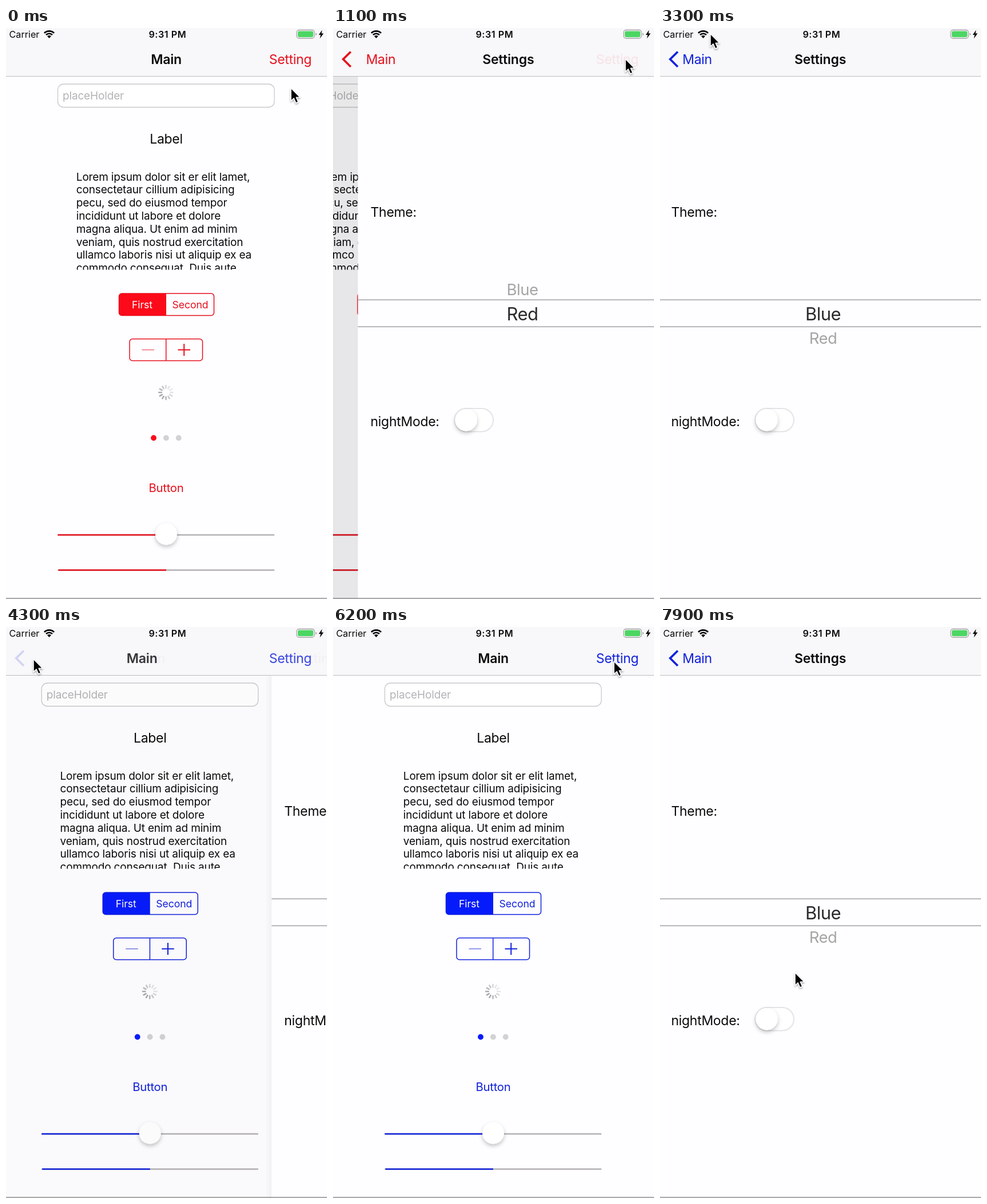
Animation, 561 px wide and 998 px high, one loop 8000 ms. Source, as an HTML page:

```html
<!DOCTYPE html>
<html lang="en">
<head>
<meta charset="utf-8">
<title>Theme switch</title>
<style>
  html, body { margin: 0; width: 100%; height: 100%; overflow: hidden; background: #fefdff; }
  svg { display: block; width: 561px; height: 998px; --tint: #e60f1c; --fill: #fc0a1a; }
  svg.blue { --tint: #1021dc; --fill: #061bfb; }
  text { font-family: Inter, "Liberation Sans", sans-serif; fill: #0a0a0a; }
  .mid { text-anchor: middle; }
  .status { font-size: 16.2px; }
  .clock { font-weight: 600; letter-spacing: .5px; }
  .title { font-size: 23px; font-weight: 600; letter-spacing: -.2px; }
  .label { font-size: 23px; letter-spacing: -.3px; }
  .body { font-size: 19px; letter-spacing: -.16px; }
  .segment { font-size: 17.6px; letter-spacing: -.05px; }
  .button { font-size: 20.3px; letter-spacing: -.25px; }
  .row { font-size: 31px; letter-spacing: -.5px; }
  .tint { fill: var(--tint); }
  .fill { fill: var(--fill); }
  .line { fill: none; stroke: var(--tint); stroke-width: 1.5; }
  .track { fill: none; stroke: #b2b1b4; stroke-width: 2.7; stroke-linecap: round; }
  .done { stroke: var(--tint); }
  .rule { stroke: #8f8e91; stroke-width: 1.3; }
  .page { fill: #fefdff; }
</style>
</head>
<body>
<svg id="stage" viewBox="0 0 561 998">
  <defs>
    <clipPath id="textBox"><rect x="110" y="240" width="340" height="182.5"/></clipPath>
    <linearGradient id="edge">
      <stop offset="0" stop-color="#000" stop-opacity="0"/>
      <stop offset="1" stop-color="#000" stop-opacity=".045"/>
    </linearGradient>
    <filter id="soft" x="-50%" y="-50%" width="200%" height="200%">
      <feDropShadow dx="0" dy="3.5" stdDeviation="3.5" flood-color="#000" flood-opacity=".24"/>
    </filter>
    <filter id="lift" x="-50%" y="-50%" width="200%" height="200%">
      <feDropShadow dx="0" dy="2" stdDeviation="1.4" flood-color="#000" flood-opacity=".35"/>
    </filter>
  </defs>

  <rect class="page" width="561" height="998"/>

  <g id="main">
    <rect x="90.5" y="98" width="378.5" height="40.5" rx="10" fill="#fff" stroke="#c9c8cb" stroke-width="1.3"/>
    <text class="body" x="99" y="124.5" style="fill:#b3b2b6">placeHolder</text>
    <text class="label mid" x="280" y="202.3">Label</text>
    <g id="lorem" clip-path="url(#textBox)"></g>

    <path class="fill" d="M280 464H202.5a5 5 0 0 0-5 5V497.5a5 5 0 0 0 5 5H280z"/>
    <rect class="line" x="197.5" y="464" width="166" height="38.5" rx="5"/>
    <text class="segment mid" x="238" y="489.8" style="fill:#fff">First</text>
    <text class="segment mid tint" x="322" y="489.8">Second</text>

    <rect class="line" x="216" y="543.5" width="127.5" height="38" rx="5"/>
    <path class="line" d="M279.7 543.5v38"/>
    <path class="line" d="M237.5 562.5h21.5" opacity=".6"/>
    <path class="line" d="M300.5 562.5h21.5M311.2 552v21" style="stroke-width:2"/>

    <g id="spinner" transform="translate(279.5 637)" stroke-width="2.6" stroke-linecap="round"></g>

    <circle class="fill" cx="258" cy="716.5" r="4.9"/>
    <circle cx="279.9" cy="716.5" r="4.9" fill="#d2d1d4"/>
    <circle cx="301.7" cy="716.5" r="4.9" fill="#d2d1d4"/>

    <text class="button mid tint" x="280" y="810.5">Button</text>

    <path class="track" d="M91.5 886H468"/>
    <path class="track done" d="M91.5 886H280"/>
    <circle cx="280" cy="884.5" r="19" fill="#fff" filter="url(#soft)"/>
    <path class="track" d="M91.5 947.5H468"/>
    <path class="track done" d="M91.5 947.5H280" style="stroke-linecap:butt"/>
  </g>
  <rect id="dim" y="84" width="561" height="914"/>

  <g id="settings">
    <rect id="shade" x="-13.5" y="84" width="11" height="914" fill="url(#edge)"/>
    <rect class="page" x="-2.5" y="84" width="563.5" height="914"/>
    <text class="label" x="19.5" y="329.8">Theme:</text>
    <path class="rule" d="M-2.5 475.2H561M-2.5 522.2H561"/>
    <text class="row mid" id="blueRow">Blue</text>
    <text class="row mid" id="redRow">Red</text>
    <text class="label" x="19.5" y="695.8">nightMode:</text>
    <rect x="166.5" y="665" width="67.5" height="40.5" rx="20.25" fill="#fff" stroke="#e4e3e7" stroke-width="2"/>
    <circle cx="186.5" cy="685.2" r="19.3" fill="#fff" filter="url(#soft)"/>
  </g>

  <rect width="561" height="84" fill="#f8f7f9"/>
  <path d="M0 84.5H561" stroke="#bdbcc0"/>
  <g id="mainTitle"><text class="title mid" x="280" y="62.8">Main</text></g>
  <g id="setTitle"><text class="title mid" x="280" y="62.8">Settings</text></g>
  <g id="backLabel"><text class="label mid tint" x="65" y="62.8">Main</text></g>
  <path id="chevron" d="M31 41.5L17.7 54.6L31 67.7" fill="none" stroke="var(--tint)" stroke-width="3.6"/>
  <g id="setButton"><text class="label mid tint" x="497" y="62.8">Setting</text></g>

  <text class="status" x="5.5" y="17.2">Carrier</text>
  <text class="status clock mid" x="282.3" y="17.2">9:31 PM</text>
  <path d="M75.5 18l-3.4-3.7a4.8 4.8 0 0 1 6.8 0z"/>
  <path d="M70 12a7.8 7.8 0 0 1 11 0M66.9 8.9a12.2 12.2 0 0 1 17.2 0" fill="none" stroke="#000" stroke-width="2.7"/>
  <rect x="508" y="3.5" width="31" height="14.5" rx="4" fill="none" stroke="#a3a2a5" stroke-width="1.3"/>
  <rect x="510" y="5.5" width="27" height="10.5" rx="2.2" fill="#4cd663"/>
  <path d="M541 8.5q2 .7 2 2.3t-2 2.3z" fill="#a3a2a5"/>
  <path d="M552.5 3.5L546.5 12H550L548.5 18.5L555 9.5H551.3z"/>

  <path d="M0 996.8H561" stroke="#77767a" stroke-width="1.3"/>
  <circle id="ring" r="32.8" fill="none" stroke="#0a0a0a" stroke-width="2.2"/>
  <path id="cursor" d="M0 0V22.5L5 17.8L8.7 26L12.7 24.3L9.2 16.2H16z" stroke="#fff" stroke-width="1.5" stroke-linejoin="round" filter="url(#lift)"/>
</svg>

<script>
const LOOP = 8000, STEP = 100, WIDTH = 561, NS = "http://www.w3.org/2000/svg";
const el = id => document.getElementById(id);

function add(parent, tag, attrs, text = "") {
  const node = document.createElementNS(NS, tag);
  for (const key in attrs) node.setAttribute(key, attrs[key]);
  node.textContent = text;
  parent.append(node);
}

["Lorem ipsum dolor sit er elit lamet,", "consectetaur cillium adipisicing",
 "pecu, sed do eiusmod tempor", "incididunt ut labore et dolore",
 "magna aliqua. Ut enim ad minim", "veniam, quis nostrud exercitation",
 "ullamco laboris nisi ut aliquip ex ea", "commodo consequat. Duis aute"
].forEach((line, i) =>
  add(el("lorem"), "text", { class: "body", x: 122.8, y: 266.6 + i * 22.8 }, line));

for (let i = 0; i < 12; i++) {
  const grey = Math.round(200 - 32 * Math.cos((i - 8) * Math.PI / 6));
  add(el("spinner"), "path", {
    d: "M0-7.8V-12.3", transform: `rotate(${i * 30})`, stroke: `rgb(${grey},${grey},${grey})`
  });
}

// time, x, y of the pointer tip
const POINTER = [
  [0, 498, 105], [200, 498, 105], [600, 511, 54], [1200, 511, 54], [1500, 430, 240],
  [1900, 285, 487], [2150, 285, 487], [2500, 285, 544], [2700, 285, 544], [3000, 180, 250],
  [3300, 88, 10], [3600, 48, 56], [4750, 48, 56], [5000, 290, 44], [5200, 512, 120],
  [5400, 470, 560], [5600, 260, 860], [5800, 100, 640], [6000, 150, 200], [6200, 491, 60],
  [6400, 488, 52], [7100, 488, 52], [7400, 348, 62], [7600, 57, 220], [7900, 236, 604]
];
const PUSH_TIME = 540, PUSH = 859, POP = 4121, PUSH_AGAIN = 6690, THEME = 2680;

const clamp = v => Math.min(1, Math.max(0, v));
const mix = (a, b, k) => a + (b - a) * k;

function pointerAt(t) {
  const i = POINTER.findIndex(p => p[0] > t);
  if (i < 0) return POINTER[POINTER.length - 1].slice(1);
  const a = POINTER[i - 1], b = POINTER[i], k = (t - a[0]) / (b[0] - a[0]);
  return [mix(a[1], b[1], k), mix(a[2], b[2], k)];
}

// cubic-bezier(.36, .66, .04, 1), solved by bisection
function glide(k) {
  const curve = (u, a, b) => 3 * (1 - u) ** 2 * u * a + 3 * (1 - u) * u * u * b + u ** 3;
  let lo = 0, hi = 1;
  for (let i = 0; i < 24; i++) {
    const u = (lo + hi) / 2;
    if (curve(u, .36, .04) < k) lo = u; else hi = u;
  }
  return curve(lo, .66, 1);
}

const slide = (t, start) => {
  const k = clamp((t - start) / PUSH_TIME);
  return k === 0 || k === 1 ? k : glide(k);
};

function place(id, x, y = 0, opacity = 1) {
  el(id).setAttribute("transform", `translate(${x} ${y})`);
  el(id).setAttribute("opacity", clamp(opacity));
}

function placeRow(id, offset) {
  const far = Math.min(1, Math.abs(offset)), size = mix(1, .885, far);
  const grey = Math.round(mix(42, 165, clamp(far * 1.6)));
  const y = 499.3 + offset * 42.6 + 11.2 * size;
  el(id).setAttribute("transform", `translate(285 ${y}) scale(${size})`);
  el(id).style.fill = `rgb(${grey},${grey},${grey})`;
}

function draw(t) {
  const s = slide(t, PUSH) - slide(t, POP) + slide(t, PUSH_AGAIN);
  el("stage").classList.toggle("blue", t >= THEME);

  place("main", -WIDTH * .3 * s);
  place("dim", 0, 0, .1 * s);
  place("settings", WIDTH * (1 - s), 0, s > 0 ? 1 : 0);
  place("shade", 0, 0, 1 - s);

  place("mainTitle", -252 * s, 0, 1 - 1.1 * s);
  place("backLabel", 225 * (1 - s), 0, s < .9 ? s * s * 1.1 : 1);
  place("setTitle", 320 * (1 - s), 0, 1.3 * s - .2);
  place("chevron", 0, 0, s > .9 ? 1 : s);
  place("setButton", 0, 0, 1 - s);

  const k = clamp((t - 2150) / 450), turn = k * k * (3 - 2 * k);
  placeRow("blueRow", turn - 1);
  placeRow("redRow", turn);

  const [x, y] = pointerAt(t);
  place("cursor", x, y);
  place("ring", x, y + 3, t >= 2000 && t < 2700 ? 1 : 0);
}

const begin = performance.now();
function tick() {
  const t = (performance.now() - begin) % LOOP;
  draw(Math.floor(t / STEP) * STEP);
  requestAnimationFrame(tick);
}
tick();
</script>
</body>
</html>
```
